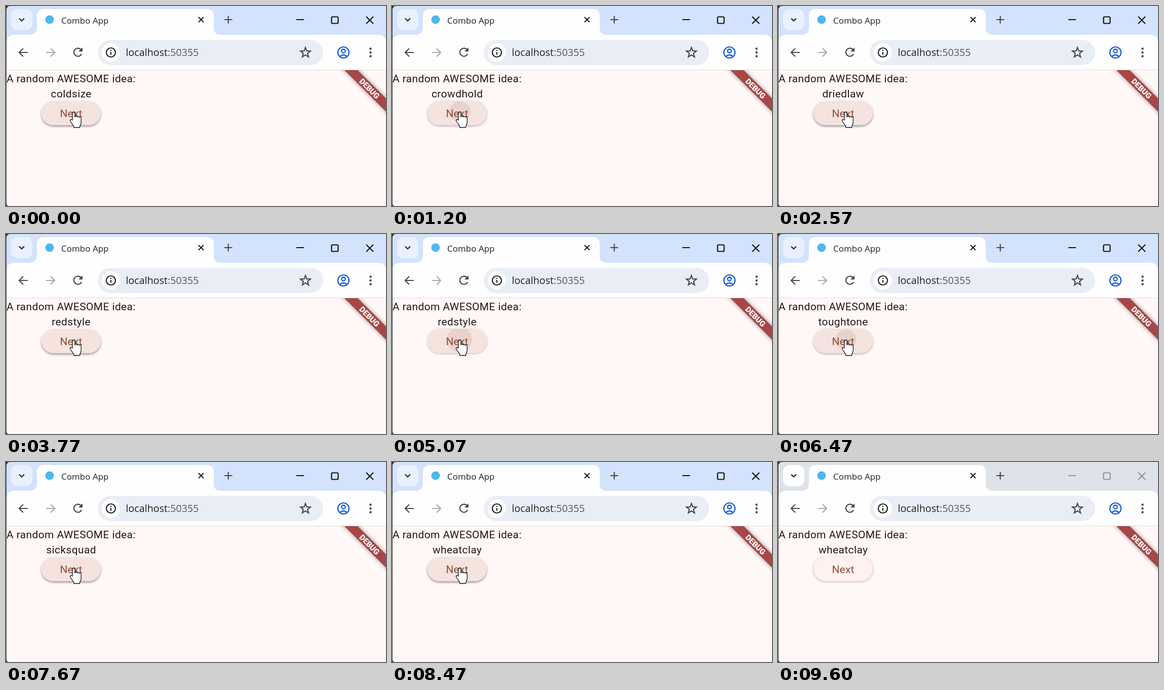
An HTML page that plays this animation: 750 by 396 pixels, repeating every 9.63 s.

```html
<!DOCTYPE html>
<html lang="en">
<head>
<meta charset="utf-8">
<title>Word pairs</title>
<style>
  html, body { margin: 0; width: 100%; height: 100%; overflow: hidden; background: #2b2b2b; }
  svg { display: block; width: 750px; height: 396px; }
  .ui { font-family: "Open Sans", "Noto Sans", sans-serif; }
  .app { font: 21px Roboto, sans-serif; letter-spacing: .375px; fill: #231917; }
  .line { fill: none; stroke-width: 2.2; }
</style>
</head>
<body>
<svg viewBox="0 0 750 396">
  <defs>
    <clipPath id="pageClip"><rect x="1" y="127" width="749" height="269"/></clipPath>
    <clipPath id="buttonClip"><rect x="70" y="188" width="117" height="48" rx="24"/></clipPath>
    <filter id="soft" x="-30%" y="-50%" width="160%" height="200%"><feGaussianBlur stdDeviation="2"/></filter>
    <filter id="glow" x="-30%" y="-100%" width="160%" height="300%"><feGaussianBlur stdDeviation="4"/></filter>
  </defs>

  <!-- Tab strip -->
  <path id="strip" d="M1 80V8Q1 0 9 0H750V80Z"/>
  <rect id="chevronBox" x="10" y="6" width="42" height="42" rx="13"/>
  <path class="line" d="M26 24.500l5 5 5-5" stroke="#1f1f1f" stroke-width="2.500"/>
  <path d="M1 127V73Q1 57 17 57H45Q61 57 61 43V20Q61 6 75 6H396Q410 6 410 20V43Q410 57 424 57H734Q750 57 750 73V127Z" fill="#fefefe"/>
  <circle cx="86" cy="27" r="8.500" fill="#4bb9f0"/>
  <text class="ui" x="109" y="35" font-size="17" fill="#1f1f1f">Combo App</text>
  <path class="line" d="M380 22l10 10m0-10l-10 10" stroke="#1f1f1f" stroke-width="2.500"/>
  <path class="line" d="M431 27h15.500M438.700 19.500v15" stroke="#474747"/>
  <g id="windowButtons" class="line" stroke-width="2">
    <path d="M573 27h15M711 21l14 14m0-14l-14 14"/>
    <rect x="642.500" y="21.500" width="13" height="13" rx="2"/>
  </g>

  <!-- Toolbar -->
  <path class="line" d="M43 92H26m8-8l-8 8 8 8" stroke="#474747"/>
  <path class="line" d="M79 92h17m-8-8l8 8-8 8" stroke="#a8a8a8"/>
  <path class="line" d="M149.200 95a8 8 0 1 1-1-8.500l2 2.500" stroke="#474747"/>
  <path d="M151 82v8h-8z" fill="#474747"/>
  <rect x="181" y="67" width="445" height="50" rx="25" fill="#e9eef6"/>
  <circle cx="207" cy="92" r="18" fill="#fefefe"/>
  <g stroke="#1f1f1f" class="line">
    <circle cx="207" cy="92" r="9"/>
    <path d="M207 91v5.500M207 86.700v2.300"/>
  </g>
  <text class="ui" x="236.500" y="99" font-size="19.700" fill="#1f1f1f">localhost<tspan fill="#575a5e">:50355</tspan></text>
  <path id="star" class="line" stroke="#474747" stroke-width="2"/>
  <g class="line" stroke="#0b57d0">
    <circle cx="666" cy="92" r="11"/>
    <circle cx="666" cy="89" r="3.700"/>
    <path d="M658.500 100q7.500-6.500 15 0"/>
  </g>
  <g fill="#474747">
    <circle cx="719.500" cy="84.500" r="2.200"/><circle cx="719.500" cy="92" r="2.200"/><circle cx="719.500" cy="99.500" r="2.200"/>
  </g>

  <!-- Page -->
  <path d="M1 126H750V396H6Q1 396 1 391Z" fill="#fff8f6"/>
  <path d="M1 126.500H750" stroke="#dcdde0"/>
  <text class="app" x="1" y="151">A random AWESOME idea:</text>
  <text class="app" id="word" x="128.700" y="181" text-anchor="middle"></text>
  <rect id="shadow" x="70" y="188" width="117" height="48" rx="24" fill="#454058" filter="url(#soft)"/>
  <rect x="70" y="188" width="117" height="48" rx="24" fill="#fff1ed"/>
  <rect id="hover" x="70" y="188" width="117" height="48" rx="24" fill="#f4e3de"/>
  <g clip-path="url(#buttonClip)"><circle id="ripple" fill="#8f4c38"/></g>
  <text class="app" x="128.500" y="220" text-anchor="middle" style="fill:#8f4c38;letter-spacing:.15px">Next</text>

  <g clip-path="url(#pageClip)">
    <g transform="translate(717.500 163.500) rotate(45)">
      <rect x="-90" y="-9" width="180" height="18" fill="#26222c" opacity=".55" filter="url(#glow)"/>
      <rect x="-90" y="-9.200" width="180" height="18.400" fill="#a94645"/>
      <text y="5.500" text-anchor="middle" font-family="Roboto, sans-serif" font-size="15.300" font-weight="900" fill="#fff">DEBUG</text>
    </g>
  </g>

  <g id="cursor" fill="#fff" stroke="#111" stroke-width="1.300" stroke-linejoin="round">
    <path id="hand" d="M131 226V212c0-3 5-3 5 0v8c0-3 4.500-2.500 4.500 0 0-2 4-2 4 .5 0-2 3.800-1.500 3.800 1v8c0 5-2 6-3 11h-11c-1-5-4-7-7-12-2-4 1-5 3.700-2.500z"/>
    <path id="arrow" d="M133 210v22l5-5 3.500 8 3.500-1.500-3.500-8h7.500z"/>
  </g>
</svg>
<script>
const LOOP = 9630, HOLD = 170, LEAVE = 8550, BLUR = 9300;
const WORDS = ["coldsize", "crowdhold", "driedlaw", "redstyle", "toughtone", "sicksquad", "wheatclay"];
const PRESSES = [150, 1130, 3000, 4920, 6400, 7800];
const el = Object.fromEntries([...document.querySelectorAll("[id]")].map(e => [e.id, e]));
const clamp = x => Math.min(1, Math.max(0, x));
const ramp = (t, start, length) => clamp((t - start) / length);
const mix = (a, b, k) => a + (b - a) * k;
const smooth = x => x * x * (3 - 2 * x);
const set = (e, attrs) => { for (const k in attrs) e.setAttribute(k, attrs[k]); };

const starPoints = Array.from({ length: 10 }, (_, i) => {
  const a = -Math.PI / 2 + i * Math.PI / 5, r = i % 2 ? 4.4 : 10.3;
  return [591 + r * Math.cos(a), 92.5 + r * Math.sin(a)];
});
el.star.setAttribute("d", "M" + starPoints.join("L") + "Z");

function drawRipple(t) {
  const press = PRESSES.findLast(p => p <= t) ?? -LOOP;
  const age = t - press, released = age - HOLD;
  const held = smooth(clamp(Math.min(age, HOLD) / 1000)) * 2.2;
  const growth = mix(held, 1, smooth(ramp(released, 0, 225)));
  const opacity = 0.11 * ramp(age, 0, 60) * (1 - ramp(released, 225, 150));
  set(el.ripple, { cx: mix(134, 128.5, growth), cy: mix(209, 212, growth), r: mix(19, 63, growth), opacity });
  return ramp(age, 0, 120) * (1 - ramp(released, 0, 200));
}

function draw(t) {
  const pressed = drawRipple(t);
  el.word.textContent = WORDS[PRESSES.filter(p => p + HOLD <= t).length];

  const travel = ramp(t, LEAVE, 400) ** 2;
  const cursorY = 200 * travel;
  const outside = cursorY > 26;
  set(el.cursor, { transform: `translate(${60 * travel} ${cursorY})`, visibility: travel < 1 ? "visible" : "hidden" });
  el.hand.style.display = outside ? "none" : "";
  el.arrow.style.display = outside ? "" : "none";

  const exit = LEAVE + 400 * Math.sqrt(26 / 200);
  const lift = (1 - pressed) * (1 - ramp(t, exit, 200));
  set(el.hover, { opacity: 1 - ramp(t, exit, 80) });
  set(el.shadow, { transform: `translate(0 ${mix(1, 2.5, lift)})`, opacity: mix(0.38, 0.55, lift) });

  const focused = t < BLUR;
  set(el.strip, { fill: focused ? "#d3e3fd" : "#dde3e9" });
  set(el.chevronBox, { fill: focused ? "#e9f1fe" : "#fefefe" });
  set(el.windowButtons, { stroke: focused ? "#111" : "#8f9296" });
}

function tick() {
  draw(performance.now() % LOOP);
  requestAnimationFrame(tick);
}
tick();
</script>
</body>
</html>
```
